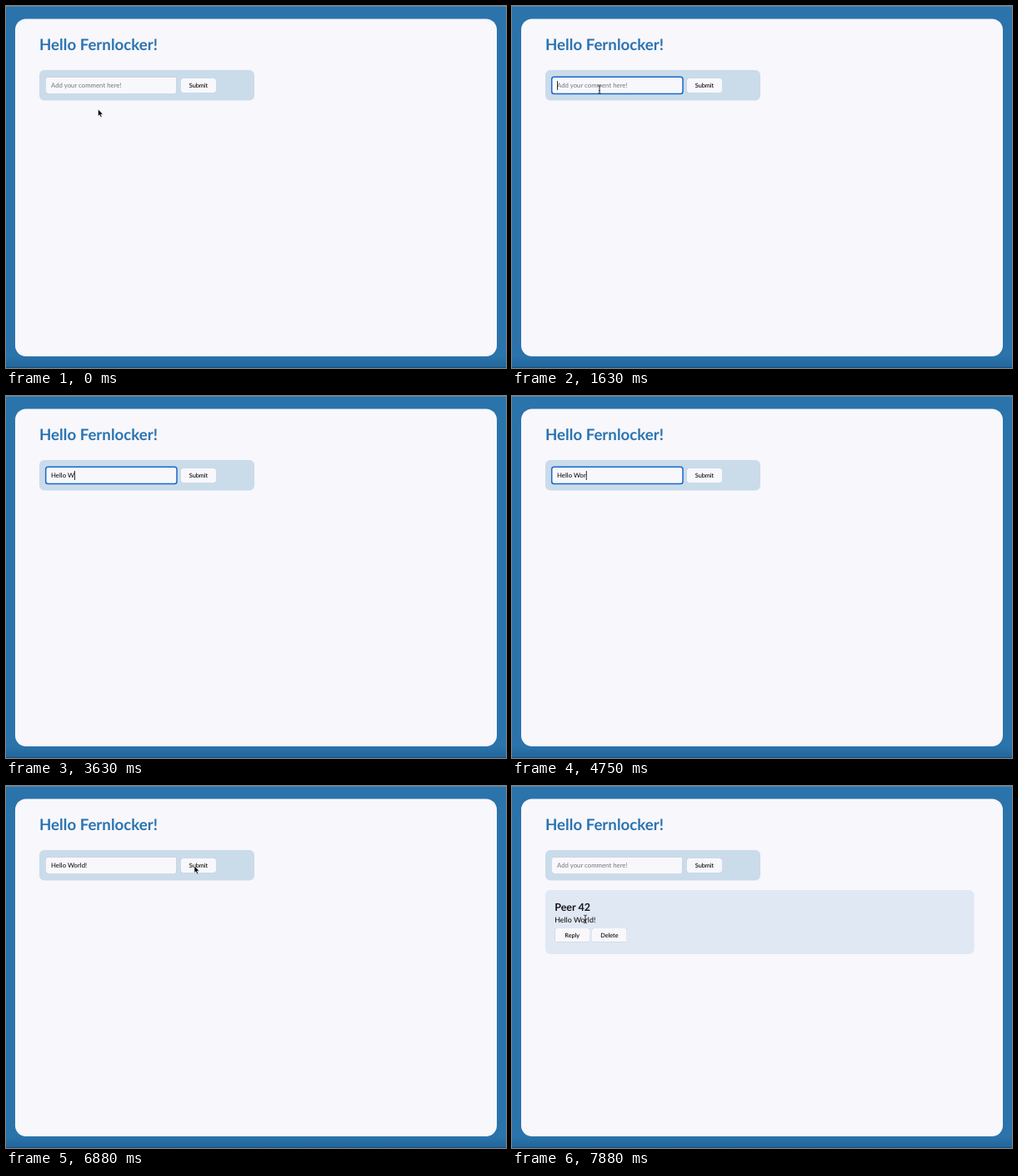
Write an HTML page that moves like this. It is 600 by 435 pixels and loops after 8 s.

```html
<!DOCTYPE html>
<html lang="en">
<head>
<meta charset="utf-8">
<title>Comment form</title>
<style>
  html, body { margin: 0; width: 100%; height: 100%; overflow: hidden; background: #2a73ab; }
  svg { display: block; width: 600px; height: 435px; }
  text { font: 400 7.8px Lato, "Open Sans", sans-serif; text-rendering: geometricPrecision; white-space: pre; }
  .title { font-size: 18.7px; font-weight: 700; fill: #2a73b0; }
  .user { font-size: 12.5px; font-weight: 700; fill: #14161c; }
  .body { font-size: 8.9px; }
  .label { font-size: 7.3px; font-weight: 500; text-anchor: middle; }
  .hint { fill: #74757c; }
  .raised { fill: #f8f8fc; filter: drop-shadow(0 .8px .7px rgba(45, 60, 90, .5)); }
  .ring { fill: #f8f8fc; stroke: #1768cc; stroke-width: 1.5; }
</style>
</head>
<body>
<svg viewBox="0 0 600 435">
  <defs>
    <linearGradient id="shade" x1="0" y1="0" x2="0" y2="1">
      <stop offset="0" stop-color="#1d5f95" stop-opacity="0"/>
      <stop offset="1" stop-color="#1d5f95" stop-opacity=".7"/>
    </linearGradient>
  </defs>
  <rect width="600" height="435" fill="#2a73ab"/>
  <rect y="421" width="600" height="14" fill="url(#shade)"/>
  <rect width="600" height="1" fill="#5f88a8"/>
  <rect y="434" width="600" height="1" fill="#1b4d78"/>
  <rect x="11" y="15.5" width="578" height="405.5" rx="13" fill="#f7f7fc"/>
  <text class="title" x="40" y="53">Hello Fernlocker!</text>

  <rect x="40" y="77" width="258" height="36.5" rx="6" fill="#cadbea"/>
  <rect id="field" class="raised" x="48" y="85.5" width="156.5" height="19.5" rx="2"/>
  <rect id="ring" class="ring" x="47.7" y="85.2" width="157.3" height="20.3" rx="2.8"/>
  <text id="hint" class="hint" x="54" y="98.2">Add your comment here!</text>
  <text id="typed" x="54" y="98.2"></text>
  <rect id="caret" y="90" width=".8" height="11"/>
  <rect class="raised" x="210" y="87" width="42" height="17" rx="2"/>
  <text class="label" x="231" y="98.1">Submit</text>

  <g id="comment">
    <rect x="40" y="125" width="514.5" height="77" rx="6" fill="#e0e8f3"/>
    <text class="user" x="51.2" y="149.8">Peer 42</text>
    <text class="body" x="51.2" y="163.8">Hello World!</text>
    <rect class="raised" x="51.5" y="171" width="41.5" height="16.5" rx="2"/>
    <text class="label" x="72.2" y="181.8">Reply</text>
    <rect class="raised" x="96" y="171" width="41.8" height="16.5" rx="2"/>
    <text class="label" x="116.9" y="181.8">Delete</text>
  </g>

  <g id="pointer">
    <path id="arrow" d="M0 0V8.4L1.9 6.7 3.2 9.8 4.7 9.2 3.4 6.2H6Z" fill="#000" stroke="#fff" stroke-width=".6"/>
    <path id="beam" d="M-1.8-4.8Q0-4.8 0-3.8 0-4.8 1.8-4.8M0-3.8V3.8M-1.8 4.8Q0 4.8 0 3.8 0 4.8 1.8 4.8M-1 1.2H1" fill="none" stroke="#222" stroke-width=".9"/>
  </g>
</svg>
<script>
const LOOP = 8000, TICK = 125;
const FOCUS = 750, BLUR = 6875, POSTED = 7000;
const MESSAGE = "Hello World!";
const keyTimes = [2000, 2250, 2500, 2875, 3000, 3125, 3250, 3875, 4000, 5000, 5125, 5500];
const HIDE = 2000, SHOW = 5625;

// time, x, y of the pointer's hot spot
const path = [
  [0, 110.5, 124], [125, 108, 118], [375, 108, 118], [500, 106, 108], [625, 105, 100.5],
  [5625, 105, 100.5], [5750, 128, 97], [6000, 148, 97], [6250, 188, 98], [6500, 222, 97],
  [6750, 226, 96], [7250, 226, 96], [7500, 200, 102], [7625, 167, 114],
  [7750, 122, 142], [7875, 88, 160], [LOOP, 88, 160]
];

const el = Object.fromEntries([...document.querySelectorAll("svg [id]")].map(n => [n.id, n]));
const show = (node, on) => node.style.display = on ? "" : "none";

function pointAt(t) {
  const i = path.findIndex(p => p[0] > t);
  const [t0, x0, y0] = path[i - 1], [t1, x1, y1] = path[i];
  const k = (t - t0) / (t1 - t0);
  return [x0 + (x1 - x0) * k, y0 + (y1 - y0) * k];
}

function render(t) {
  const posted = t >= POSTED;
  const focused = t >= FOCUS && t < BLUR;
  const pressed = keyTimes.filter(k => k <= t);
  const text = posted ? "" : MESSAGE.slice(0, pressed.length);

  el.typed.textContent = text;
  show(el.hint, !text);
  show(el.field, !focused);
  show(el.ring, focused);
  show(el.comment, posted);

  // The caret stays lit after a key press, then blinks.
  const idle = t - (pressed.at(-1) ?? FOCUS);
  show(el.caret, focused && idle % 750 < 500);
  el.caret.setAttribute("x", 54 + (text ? el.typed.getComputedTextLength() : 0));

  const [x, y] = pointAt(t);
  const overField = x > 48 && x < 204 && y > 85 && y < 105;
  const overText = posted && x > 51 && x < 101 && y > 154 && y < 167;
  show(el.pointer, t < HIDE || t >= SHOW);
  show(el.beam, overField || overText);
  show(el.arrow, !overField && !overText);
  el.pointer.setAttribute("transform", `translate(${x} ${y})`);
}

const start = performance.now();
function frame() {
  const t = (performance.now() - start) % LOOP;
  render(Math.floor(t / TICK) * TICK);
  requestAnimationFrame(frame);
}
frame();
</script>
</body>
</html>
```
